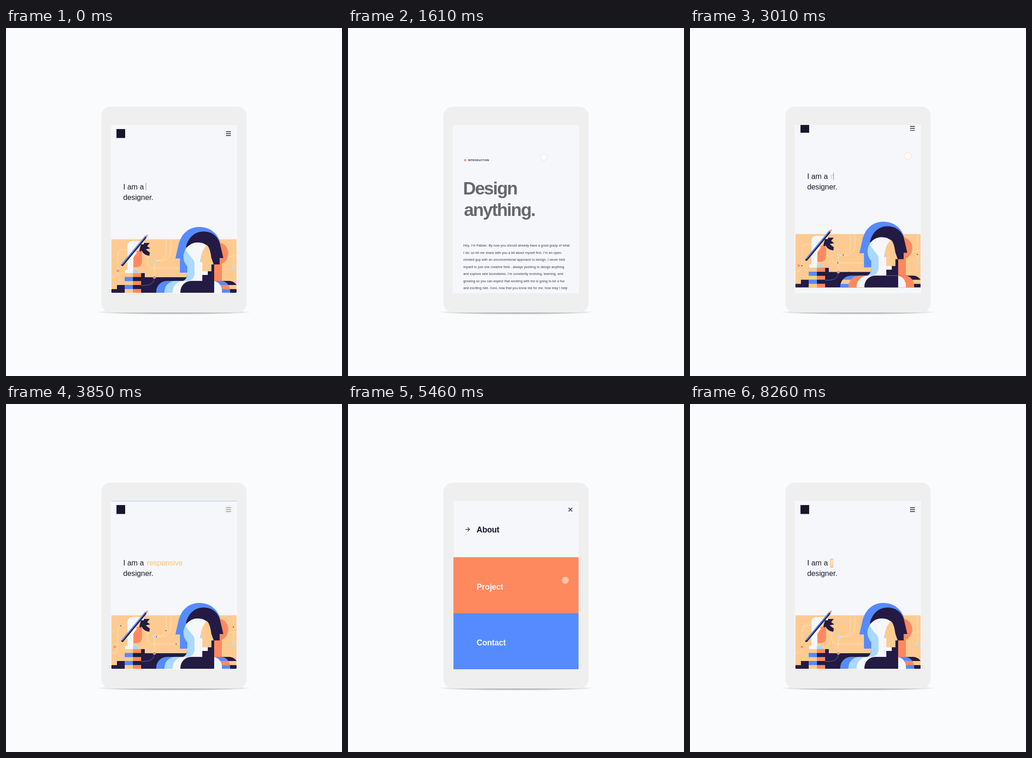
An HTML page that plays this animation: 736 by 761 pixels, repeating every 8.33 s.

```html
<!DOCTYPE html>
<html lang="en">
<head>
<meta charset="utf-8">
<title>Portfolio on a tablet</title>
<style>
html, body { margin: 0; width: 100%; height: 100%; overflow: hidden; background: #fafbfd; }
svg { display: block; width: 736px; height: 761px; font-family: "Liberation Sans", Arial, sans-serif; }
.peach { fill: #fdcb91; } .orange { fill: #ff895f; } .blue { fill: #568bff; }
.light { fill: #a9d9ff; } .dark { fill: #231b43; } .white { fill: #f6f7fb; }
.ink { fill: #17162b; }
.hero { font-size: 16.3px; }
.label { font-size: 17.5px; font-weight: 700; letter-spacing: -.15px; }
.icon { fill: none; stroke: #17162b; stroke-width: 1.4; }
.wire { fill: none; stroke: #fff; stroke-opacity: .55; stroke-width: .8; }
</style>
</head>
<body>
<svg viewBox="0 0 736 761">
  <defs>
    <clipPath id="screen"><rect x="229.5" y="212" width="276.5" height="368"/></clipPath>
    <clipPath id="art"><rect x="231" y="430" width="274" height="149"/></clipPath>
    <radialGradient id="shade">
      <stop offset="0" stop-color="#8d8d8d" stop-opacity=".75"/>
      <stop offset=".75" stop-color="#999" stop-opacity=".5"/>
      <stop offset="1" stop-color="#aaa" stop-opacity="0"/>
    </radialGradient>
    <pattern id="bandBlue" patternUnits="userSpaceOnUse" y="553" width="300" height="27">
      <rect width="300" height="27" class="blue"/><rect y="9" width="300" height="9" class="orange"/>
    </pattern>
    <pattern id="bandDark" patternUnits="userSpaceOnUse" y="553" width="300" height="27">
      <rect width="300" height="27" class="dark"/><rect y="9" width="300" height="9" class="peach"/>
    </pattern>
    <pattern id="bandMix" patternUnits="userSpaceOnUse" y="553" width="300" height="27">
      <rect width="300" height="27" class="blue"/><rect y="9" width="300" height="9" class="peach"/>
    </pattern>
  </defs>

  <rect width="736" height="761" fill="#fafbfd"/>
  <ellipse cx="368" cy="621.5" rx="172" ry="5" fill="url(#shade)"/>
  <rect x="209" y="172" width="318" height="450" rx="20" fill="#efefef"/>
  <rect x="229.5" y="212" width="276.5" height="368" class="white"/>

  <g clip-path="url(#screen)">
    <g id="home">
      <rect x="242" y="221" width="19" height="19.5" class="ink"/>
      <path d="M482 226.7H492.6M482 231H492.6M482 235.3H492.6" class="icon"/>
      <g clip-path="url(#art)">
        <rect x="231" y="462" width="274" height="117" class="peach"/>
        <g class="wire">
          <path id="wireA" d="M231 545Q245 545 245 531V497Q245 484 258 484H297Q310 484 310 497V512Q310 525 323 525H391"/>
          <path id="wireB" d="M325 545V509Q351 509 351 490V462"/>
          <path id="wireC" d="M325 509H338Q361 509 361 485V462M351 579V552Q351 545 343 545H325"/>
          <path id="wireD" d="M498 526V462M478 510Q485 498 505 498"/>
        </g>

        <path d="M231 579V571H243V562H260V536H304V545H400V579Z" class="dark"/>
        <g id="stack"></g>
        <path d="M325 545Q325 563 302 563H296" fill="none" stroke="#568bff" stroke-width=".8"/>

        <!-- hand, face and pencil -->
        <path d="M296 472L303 470H315L309 477L316 482L306 484L315 491L314 498Q302 497 297 487L290 494Z" class="dark"/>
        <path d="M279 523V500Q281 489 291 487L298 490V511Q297 523 285 523Z" class="orange"/>
        <path d="M261 536V529H266V478Q266 466 278 466H302V473H290L282 481V488L287 491L279 502V521L278 536Z" class="white"/>
        <path d="M278 529H290V536H278Z" class="light"/>
        <g id="pencil">
          <path d="M255 518L306 457" stroke="#231b43" stroke-width="5" stroke-linecap="round"/>
          <path d="M254 517L305 456" stroke="#568bff" stroke-width="2.4"/>
          <path d="M304 455L311 451L308 459Z" class="orange"/>
        </g>

        <!-- heads, back to front -->
        <circle cx="462" cy="493" r="25" class="orange"/>
        <path d="M456 510H473V553H456Z" class="orange"/>
        <path d="M371 504L377 478C382 451 400 435 423 435C447 435 463 449 469 468L440 535L404 553H390Q397 546 397 535H381V504Z" class="blue"/>
        <path d="M394 479C400 457 414 445 433 445C454 445 467 459 470 477L476 503H468V517H456V553H440V500Z" class="dark"/>
        <path d="M425 512C425 492 429 476 437 474C445 475 448 489 450 503L455 517H450V532H442V540H430Z" class="peach"/>
        <path d="M420 469A31 31 0 0 0 397 521V540Q397 549 388 553H420L428 512Z" class="light"/>
        <path d="M393 485A31 31 0 0 1 421 469Q433 469 440 476Q429 482 425 512H430V532H442V540H430V553H399Q413 550 413 535V517Q413 508 407 503Z" class="white"/>
        <path d="M442 540H456V554H430V540Z" class="dark"/>
        <g id="bodies"></g>
        <g id="nodes"></g>
      </g>
    </g>

    <g id="claim" class="hero ink">
      <text x="256.7" y="353">I am a</text>
      <text x="256.7" y="375.5">designer.</text>
      <rect id="mark" x="307" y="338" height="20" class="peach"/>
      <text id="word" x="308.5" y="353"></text>
      <rect id="caret" y="339" width=".9" height="16.5" fill="#77778a"/>
    </g>

    <g id="intro">
      <rect x="254.5" y="287" width="4.2" height="4.2" class="orange"/>
      <text x="263" y="291" font-size="5.2" font-weight="700" letter-spacing=".52" class="ink">INTRODUCTION</text>
      <g id="title" font-size="39" font-weight="700" letter-spacing="-2" fill="#17171c">
        <text x="252" y="364.3">Design</text>
        <text x="254" y="411.3">anything.</text>
      </g>
      <g id="copy" font-size="7.1" letter-spacing=".14" fill="#333340"></g>
    </g>

    <g id="menu"></g>
    <path id="close" d="M483.3 227L491.3 235M491.3 227L483.3 235" class="icon"/>
    <path id="arrow" d="M257 274.3H266M262 270L266.3 274.3L262 278.6" class="icon" style="stroke-width:1.2"/>
    <circle id="touch" r="7.6" fill="#fff" fill-opacity=".5" stroke="#ffb585" stroke-opacity=".45"/>
  </g>
</svg>

<script>
const LOOP = 8330, STEP = 70, TOP = 212, HEIGHT = 368;
const SVG = "http://www.w3.org/2000/svg";
const $ = id => document.getElementById(id);

function add(parent, tag, attrs, text = "") {
  const node = document.createElementNS(SVG, tag);
  set(node, attrs);
  node.textContent = text;
  return parent.appendChild(node);
}
function set(node, attrs) {
  for (const key in attrs) node.setAttribute(key, attrs[key]);
}
const shiftY = (id, y) => set($(id), { transform: `translate(0 ${y})` });
const clamp = v => Math.max(0, Math.min(1, v));
const part = (t, start, length) => clamp((t - start) / length);
const mix = (a, b, u) => a + (b - a) * u;
const sine = u => (1 - Math.cos(Math.PI * u)) / 2;
const outCubic = u => 1 - (1 - u) ** 3;
const expo = u => u <= 0 ? 0 : u >= 1 ? 1 :
  u < .5 ? 2 ** (20 * u - 10) / 2 : 1 - 2 ** (10 - 20 * u) / 2;

// Static repeats
[
  "Hey, I’m Fabian. By now you should already have a good grasp of what",
  "I do; so let me share with you a bit about myself first. I’m an open-",
  "minded guy with an unconventional approach to design. I never limit",
  "myself to just one creative field - always pushing to design anything",
  "and explore new boundaries. I’m constantly evolving, learning, and",
  "growing so you can expect that working with me is going to be a fun",
  "and exciting ride. Cool, now that you know me for me, how may I help",
  "you?"
].forEach((line, i) => add($("copy"), "text", { x: 252.7, y: 478.4 + i * 15.42 }, line));

const rows = [0, 1, 2, 3, 4].map(i => {
  const row = add($("stack"), "g", {}), y = 536 + i * 8.7;
  add(row, "rect", { x: 260, y, width: 18, height: 8.8, class: i % 2 ? "blue" : "peach" });
  add(row, "rect", { x: 278, y, width: 18, height: 8.8, class: i % 2 ? "dark" : "orange" });
  return row;
});

const leftBodies = [329, 347, 365].map(x => add($("bodies"), "path",
  { d: `M${x} 579V577A24 24 0 0 1 ${x + 24} 553H456V579Z` }));
const rightBodies = [509, 491, 473].map(x => add($("bodies"), "path",
  { d: `M430 579V553H${x - 20}A20 22 0 0 1 ${x} 575V579Z` }));
add($("bodies"), "path", { d: "M382 579V577A24 24 0 0 1 406 553H456V579Z", class: "dark" });

const nodes = [[245, 531, "orange"], [325, 509, "light"], [325, 545, "orange"], [498, 526, "light"]]
  .map(([cx, cy, name]) => add($("nodes"), "circle",
    { cx, cy, r: 3, class: name, stroke: "#fff", "stroke-opacity": .6, "stroke-width": .6 }));
const sparks = ["wireA", "wireA", "wireB", "wireC", "wireD"].map((id, i) => ({
  wire: $(id), start: (i * .37) % 1, dot: add($("nodes"), "circle", { r: 1.1, class: "dark" })
}));

// Menu panels, back to front; timings are [start, length]
const panels = [
  { name: "Contact", fill: "blue", bottom: 580, y: 527.5, ink: "#f6f7fb",
    open: 3788, shut: 6581, labelOpen: 3743, labelShut: 6545 },
  { name: "Project", fill: "orange", bottom: 457.5, y: 405.5, ink: "#f6f7fb",
    open: 3917, shut: 6477, labelOpen: 3812, labelShut: 6442 },
  { name: "About", fill: "white", bottom: 335, y: 280.5, ink: "#17162b",
    open: 4040, shut: 6376, labelOpen: 3990, labelShut: 6340 }
];
panels.forEach(p => {
  const clip = add(document.querySelector("defs"), "clipPath", { id: "clip" + p.name });
  p.mask = add(clip, "rect", { x: 230.7, y: TOP, width: 274.5 });
  const group = add($("menu"), "g", { "clip-path": `url(#clip${p.name})` });
  add(group, "rect", { x: 230.7, y: TOP, width: 274.5, height: HEIGHT, class: p.fill });
  p.label = add(group, "text", { x: 281.7, class: "label", fill: p.ink }, p.name);
});

function drawMenu(t) {
  for (const p of panels) {
    const cover = expo(part(t, p.open, 850)) - expo(part(t, p.shut, 900));
    set(p.mask, { height: Math.max(0, (p.bottom - TOP) * cover) });
    const rise = sine(part(t, p.labelOpen, 900)) - sine(part(t, p.labelShut, 817));
    set(p.label, { y: p.y - 235 * (1 - rise), opacity: rise });
  }
  set($("close"), { opacity: part(t, 4700, 250) - part(t, 6330, 150) });
  set($("arrow"), { opacity: part(t, 4750, 250) - part(t, 6330, 150) });
}

function drawWord(t) {
  let word = "", count = 0, marked = false;
  if (t < 1800) {
    word = "creative";
    count = Math.floor((t - 280) / 70);
  } else if (t < 6500) {
    word = "responsive";
    count = Math.floor((t - 2930) / 70);
  } else {
    word = "friendly";
    count = 1 + Math.ceil((8260 - t) / 70);
    marked = t >= 7770;
  }
  count = Math.max(0, Math.min(word.length, count));
  const text = $("word");
  text.textContent = word.slice(0, count);
  const end = count ? 308.5 + text.getComputedTextLength() : 306.2;
  set(text, { fill: marked ? "#fff" : "#fdbf78" });
  set($("mark"), { width: Math.max(0, end - 306), opacity: +marked });
  const typing = count > 0 && count < word.length;
  const lit = typing || t % 840 < 420;
  set($("caret"), { x: end, opacity: +(lit && !marked) });
}

function drawArt(t) {
  const swapped = t > 1900 && t < 3750;
  const paint = (shapes, fills) => shapes.forEach((s, i) => set(s, { fill: fills[i] }));
  paint(leftBodies, swapped ? ["url(#bandMix)", "#ff895f", "#f6f7fb"] : ["#568bff", "#a9d9ff", "#f6f7fb"]);
  paint(rightBodies, swapped ? ["url(#bandDark)", "#ff895f", "#f6f7fb"] : ["url(#bandDark)", "url(#bandBlue)", "#f6f7fb"]);

  const slide = 8 * (sine(part(t, 3900, 300)) - sine(part(t, 4700, 300)));
  set(rows[4], { transform: `translate(${slide} 0)` });
  const active = part(t, 200, 300) - part(t, 7500, 400);
  set(nodes[0], { cx: 245 - 7 * active });
  sparks.forEach(s => {
    const along = (s.start + t / 4165) % 1;
    const point = s.wire.getPointAtLength(along * s.wire.getTotalLength());
    set(s.dot, { cx: point.x, cy: point.y, opacity: active });
  });
}

const touchPath = [ // time, x, y, opacity
  [850, 431, 520, 0], [1000, 431, 500, 1], [1400, 429, 282.5, 1], [1950, 429, 282.5, 1],
  [2400, 440, 470, 1], [3010, 477, 279.5, 1], [3400, 487, 231, 1], [3900, 487, 231, 1],
  [4200, 487, 231, 0], [4950, 487, 250, 0], [5100, 486, 259, 1], [5460, 476, 385.5, 1],
  [5850, 474, 510, 1], [6300, 487, 231, 1], [6450, 487, 231, 1], [6650, 487, 231, 0]
];
function drawTouch(t) {
  const next = touchPath.findIndex(k => k[0] > t);
  if (next < 1) return set($("touch"), { opacity: 0 });
  const a = touchPath[next - 1], b = touchPath[next];
  const u = sine(part(t, a[0], b[0] - a[0]));
  set($("touch"), { cx: mix(a[1], b[1], u), cy: mix(a[2], b[2], u), opacity: mix(a[3], b[3], u) });
}

function draw(t) {
  const scroll = HEIGHT * (outCubic(part(t, 1000, 610)) - outCubic(part(t, 2150, 1255)));
  shiftY("home", -scroll);
  shiftY("claim", -2 * scroll);
  shiftY("intro", HEIGHT - scroll);
  set($("title"), { opacity: .64 * part(t, 1260, 350) + .36 * part(t, 1610, 280) });
  drawWord(t);
  drawArt(t);
  drawMenu(t);
  drawTouch(t);
}

const began = performance.now();
function tick() {
  const t = (performance.now() - began) % LOOP;
  draw(Math.floor(t / STEP) * STEP);
  requestAnimationFrame(tick);
}
tick();
</script>
</body>
</html>
```
